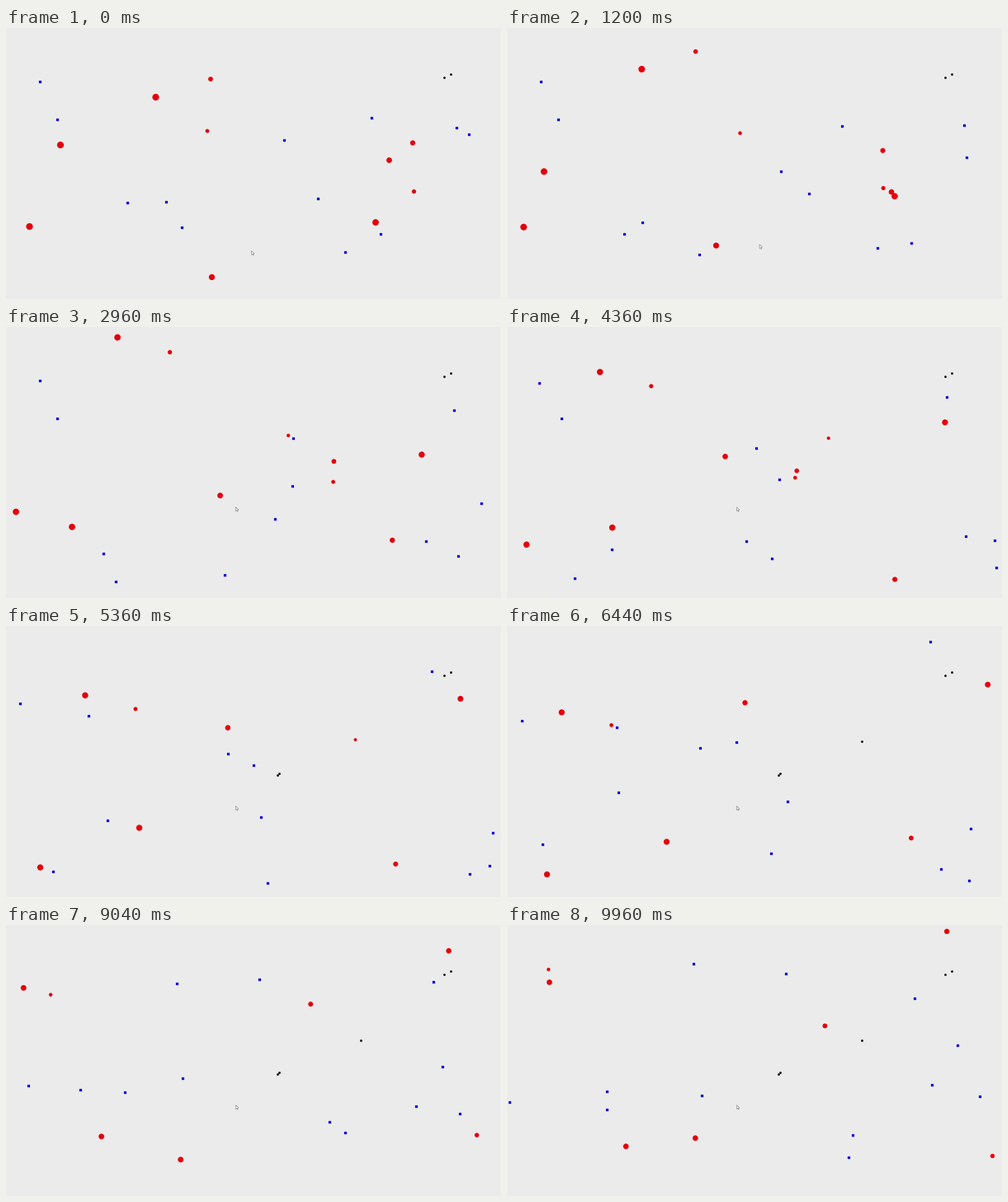
A matplotlib script for the animation above (10 s loop, 600 by 329 pixels).

```python
import numpy as np
import matplotlib.pyplot as plt
from matplotlib.animation import FuncAnimation
from matplotlib.patches import Polygon

W, H, DPI = 600, 329, 64
FRAMES, STEP_MS = 250, 40

# Starts as x, y, heading (degrees clockwise from right); reds largest first,
# blues with the two resting and the two slow ones first.
REDS = [(181.5, 84, 241.9), (66, 142, 123.2), (28.5, 241, 179),
        (448, 236, -55.4), (249.5, 302.5, -84.1), (464.5, 160.5, 87.8),
        (493, 139.5, 166.1), (248, 62, 239.9), (494.5, 198.5, 186.1),
        (244, 125, 3.9)]
BLUES = [(41, 64.5, 127), (62, 111, -4), (377.5, 207, 205.3),
         (561, 129, 238.2), (147, 211.5, 98), (193.5, 211, 139.8),
         (213, 242, 58), (336.5, 135.5, 96), (443, 109, 164.9),
         (411, 271.5, -6.9), (453.5, 249.5, 17), (545.5, 120.5, 72)]
OLD_DOTS = [(530.8, 59.8), (538.8, 55.7)]
N_RED, N = len(REDS), len(REDS) + len(BLUES)

SPEED, HOLD_MS = 0.034, 240      # px per ms, still time at the start
WAKE = 143                       # travel at which all blues reach full speed
TURN_AT, TURN_RATE = 169.8, np.radians(0.945)
SHRINK, MIN_RADIUS, CONTACT = 0.0022, 1.95, 2.8
BLUE_RADIUS, DOT_RADIUS = 1.5, 1.4
NEAR, FAR = 1.0, np.array([592.3, 311.6])   # walls, before adding the radius


def travel(t):
    """Distance covered at time t by anything at full speed."""
    return 0.0 if t < HOLD_MS else SPEED * t - 2.2


def bounce(pos, heading, radius):
    low = NEAR + radius[:, None]
    high = FAR + radius[:, None]
    inside = np.where(pos < low, 2 * low - pos, pos)
    inside = np.where(pos > high, 2 * high - pos, inside)
    hit_x, hit_y = (inside != pos).T
    heading = np.where(hit_x, np.pi - heading, heading)
    return inside, np.where(hit_y, -heading, heading)


def survivors(reds, radius, alive, s):
    """Reds die when they are too small or, once awake, when two meet."""
    alive = alive & (radius > MIN_RADIUS)
    if s > WAKE:
        gap = np.linalg.norm(reds[:, None] - reds[None], axis=2)
        gap[~alive] = gap[:, ~alive] = np.inf
        np.fill_diagonal(gap, np.inf)
        alive &= gap.min(axis=1) > CONTACT
    return alive


def simulate():
    start = np.array(REDS + BLUES)
    pos, heading = start[:, :2], np.radians(start[:, 2])
    size = np.minimum(4.1, 4.7 - 0.26 * np.arange(N_RED))
    radius = np.full(N, BLUE_RADIUS)
    pace = np.ones(N)
    pace[N_RED:N_RED + 2] = 0
    pace[N_RED + 2:N_RED + 4] = 0.34
    alive = np.ones(N, bool)

    states, last = [], 0.0
    for i in range(FRAMES):
        s = travel(i * STEP_MS)
        turn = TURN_RATE * (max(s, TURN_AT) - max(last, TURN_AT))
        step = (s - last) * np.where(s < WAKE, pace, 1) * alive
        mid = heading + turn / 2
        pos = pos + step[:, None] * np.column_stack([np.cos(mid), np.sin(mid)])
        radius[:N_RED] = size - SHRINK * s
        pos, heading = bounce(pos, heading + turn, radius)
        alive[:N_RED] = survivors(pos[:N_RED], radius[:N_RED],
                                  alive[:N_RED], s)
        states.append((pos, radius[:N_RED].copy(), alive[:N_RED].copy()))
        last = s
    return states


def area(radius):
    """Scatter size for a radius in pixels."""
    return (2 * np.asarray(radius) * 72 / DPI) ** 2


def dots(color, radius, **style):
    return ax.scatter([], [], s=area(radius), c=color, lw=0, snap=False,
                      **style)


states = simulate()

fig = plt.figure(figsize=(W / DPI, H / DPI), dpi=DPI, facecolor="#ebebeb")
ax = fig.add_axes([0, 0, 1, 1])
ax.set_xlim(0, W)
ax.set_ylim(H, 0)
ax.axis("off")

dead_dots = dots("#0a0a0a", DOT_RADIUS, zorder=1)
blue_dots = dots("#1200d8", BLUE_RADIUS + 0.1, marker="s", zorder=2)
red_dots = dots("#e4000a", 4, zorder=3)

ARROW = np.array([(0, 0), (0, 4.8), (1.2, 3.9), (2, 5.5),
                  (2.8, 5.1), (2.1, 3.6), (3.5, 3.4)])
cursor = Polygon(ARROW, fc="#f8f8f8", ec="#707070", lw=0.55, zorder=4)
ax.add_patch(cursor)


def cursor_tip(t):
    times = [240, 1200, 2300]
    return (np.interp(t, times, [297.5, 306, 278.4]),
            np.interp(t, times, [270.5, 262.8, 218.6]))


def draw(i):
    pos, radius, alive = states[i]
    reds = pos[:N_RED]
    red_dots.set_offsets(reds[alive])
    red_dots.set_sizes(area(radius[alive]))
    blue_dots.set_offsets(pos[N_RED:])
    dead_dots.set_offsets(np.vstack([OLD_DOTS, reds[~alive]]))
    cursor.set_xy(ARROW + cursor_tip(i * STEP_MS))
    return dead_dots, blue_dots, red_dots, cursor


anim = FuncAnimation(fig, draw, frames=FRAMES, interval=STEP_MS,
                     repeat=True, repeat_delay=0)
plt.show()
```
